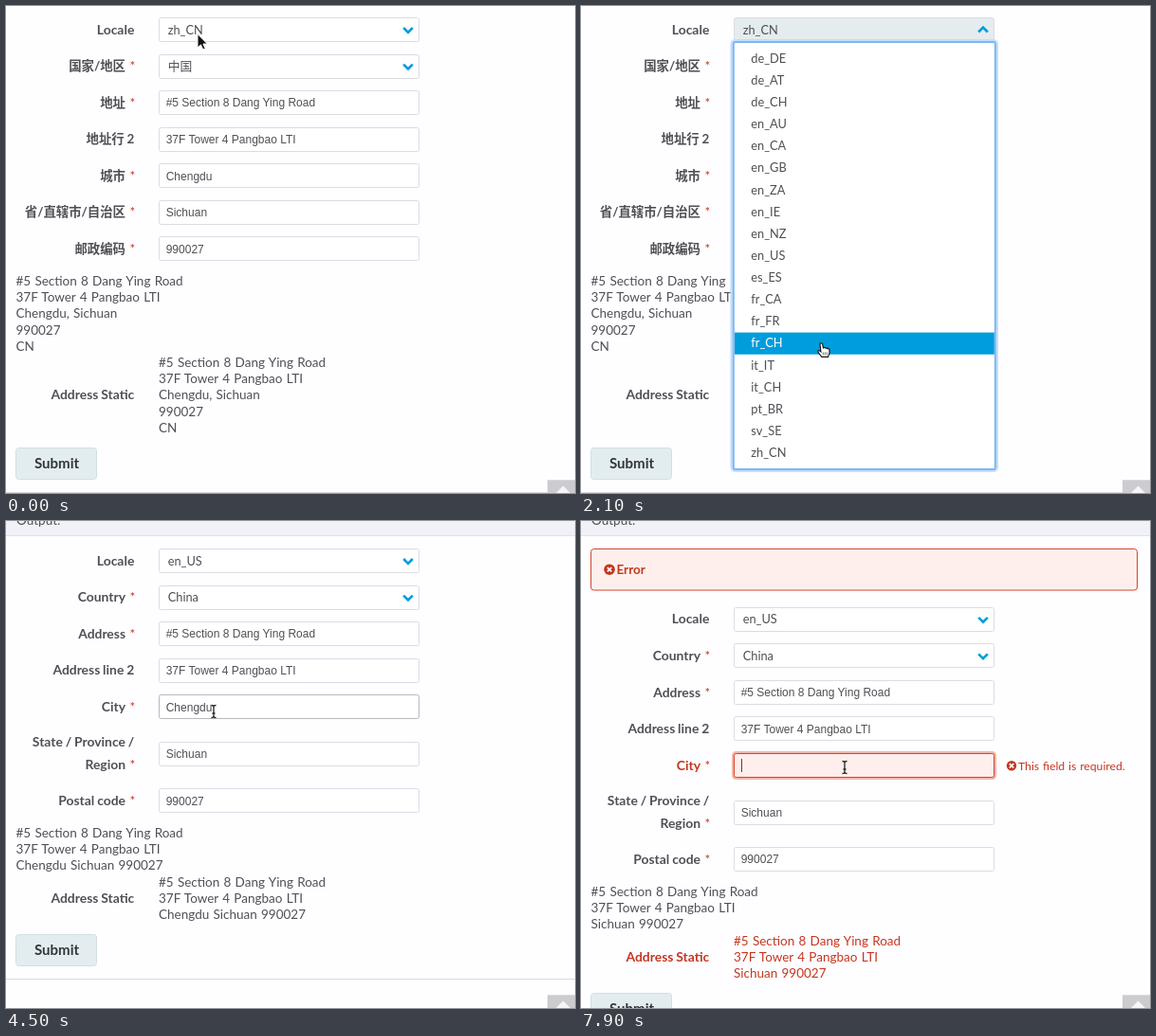
An HTML page that plays this animation: 600 px wide and 514 px high, repeating every 8000 ms.

```html
<!DOCTYPE html>
<html lang="en">
<head>
<meta charset="utf-8">
<title>Address form</title>
<style>
  html, body { margin: 0; width: 100%; height: 100%; overflow: hidden; background: #fefdff; }
  svg { display: block; width: 600px; height: 514px; }
  text { font: 13.5px Lato, "Noto Sans CJK SC", sans-serif; word-spacing: .8px; fill: #4f4f55; white-space: pre; }
  .label { font-weight: 700; font-size: 13.9px; word-spacing: -.5px; text-anchor: end; }
  .cjk { font-size: 13.4px; }
  .field { font: 12px "Liberation Sans", Arial, sans-serif; word-spacing: 0; }
  .pick { font-size: 12.8px; }
  .bold { font-weight: 700; }
  .small { font-size: 12.2px; }
  .red { fill: #c4371f; }
  .white { fill: #fff; }
  .button { font-weight: 700; font-size: 15px; fill: #30353a; }
</style>
</head>
<body>
<svg id="stage" viewBox="0 0 600 514"></svg>
<script>
const LOOP = 8000, STEP = 100, ROW = 38.55, LINE = 17.15, ITEM = 23.13;
const BLUE = '#009ddc', RED = '#d4452c', PINK = '#ffefec';
const STREET = '#5 Section 8 Dang Ying Road', TOWER = '37F Tower 4 Pangbao LTI', ZIP = '990027';
const LOCALES = ('de_DE de_AT de_CH en_AU en_CA en_GB en_ZA en_IE en_NZ en_US ' +
  'es_ES fr_CA fr_FR fr_CH it_IT it_CH pt_BR sv_SE zh_CN').split(' ');
const LABELS = {
  zh: ['Locale', '国家/地区*', '地址*', '地址行 2', '城市*', '省/直辖市/自治区*', '邮政编码*'],
  en: ['Locale', 'Country*', 'Address*', 'Address line 2', 'City*', 'State / Province /|Region*', 'Postal code*']
};
const T = { open: 1000, close: 3500, reload: 3800, hover: 4300, focus: 5600, select: 5900, erase: 6400, error: 6800, refocus: 7500 };

// time, x, y of the pointer's hot spot
const PATH = [
  [0, 202, 29.5], [900, 203, 29.5], [1100, 206, 62], [1300, 228, 167], [1700, 262, 457], [1900, 261, 452],
  [2400, 239, 179], [2600, 240, 182], [2700, 240, 184], [3400, 238, 262], [3700, 238, 262],
  [4400, 219, 201], [5200, 219, 201], [5600, 234, 200], [6500, 234, 200], [7400, 278, 260], [8000, 278, 260]
];
const BOUNCE = [[1300, 0], [1500, -5.5], [1600, -4], [1700, -2.5], [1800, -1], [2000, 0]];

function track(keys, t) {
  if (t <= keys[0][0]) return keys[0].slice(1);
  const i = keys.findIndex(k => k[0] > t);
  if (i < 0) return keys[keys.length - 1].slice(1);
  const a = keys[i - 1], b = keys[i], u = (t - a[0]) / (b[0] - a[0]);
  return a.slice(1).map((v, j) => v + (b[j + 1] - v) * u * u * (3 - 2 * u));
}

const text = (x, y, s, cls = '') => `<text x="${x}" y="${y}" class="${cls}">${s}</text>`;
const rect = (x, y, w, h, fill, stroke = 'none', r = 0, sw = 1) =>
  `<rect x="${x}" y="${y}" width="${w}" height="${h}" rx="${r}" fill="${fill}" stroke="${stroke}" stroke-width="${sw}"/>`;
const path = (d, stroke, w, fill = 'none') =>
  `<path d="${d}" stroke="${stroke}" stroke-width="${w}" fill="${fill}"/>`;
const errorIcon = (x, y, r) => `<circle cx="${x}" cy="${y}" r="${r}" fill="#c4371f"/>` +
  path(`M${x - 2.2} ${y - 2.2}l4.4 4.4m0-4.4l-4.4 4.4`, '#fff', 1.7);

function label(y, s, red) {
  const needed = s.endsWith('*'), lines = s.replace('*', '').split('|');
  const cls = 'label' + (/[^\x00-\x7f]/.test(s) ? ' cjk' : '') + (red ? ' red' : '');
  return lines.map((l, i) => {
    const ly = y + 4.6 + (i - (lines.length - 1) / 2) * 24;
    const star = needed && i === lines.length - 1;
    return text(star ? 126 : 135.3, ly, l, cls) + (star ? text(130.5, ly, '*', 'red') : '');
  }).join('');
}

function input(y, o = {}) {
  const top = Math.round(y - 13) + .5;
  const glow = o.focus ? rect(160.5, top - 1, 276, 27, 'none', o.error ? '#f5b5a9' : '#dcebfa', 3, 3) : '';
  const border = o.error ? RED : o.focus ? '#b4c9de' : o.hover ? '#b9b6be' : '#dcdbe2';
  return glow + rect(161.5, top, 274, 25, o.fill || (o.error ? PINK : '#fff'), border, 2);
}

const chevron = (y, up) => path(`M419.2 ${y + (up ? 2.5 : -2)}l4.8 ${up ? -4.8 : 4.8}l4.8 ${up ? 4.8 : -4.8}`, BLUE, 2.6);

function pointer(kind, x, y) {
  const shapes = {
    arrow: path('M0 0V14.5L3.4 11.4L5.8 16.6L8.2 15.5L5.9 10.5H10.4Z', '#fff', 1, '#111'),
    hand: path('M-1.3 .6Q0-.8 1.3 .6L2.2 5Q3.5 4 4.5 5.2Q6 4.5 6.7 5.9Q8.5 5.3 8.7 7.2V10.5L7.3 14.5H.5L-3.4 9.2Q-3.6 7 -1.6 8L-.3 9Z', '#111', 1.1, '#fff') +
      path('M2 9.5v3M4 9.5v3M6 9.5v3', '#333', .7),
    beam: path('M-2.5-6.5Q0-6.5 0-5V5Q0 6.5-2.5 6.5M2.5-6.5Q0-6.5 0-5M2.5 6.5Q0 6.5 0 5M-1.5 2h3', '#222', 1.3)
  };
  return `<g transform="translate(${x} ${y})">${shapes[kind]}</g>`;
}

function form(t) {
  const en = t >= T.reload, error = t >= T.error, open = t >= T.open && t < T.close;
  const top = error ? 103.8 : en ? 42 : 25;
  const city = t < T.erase ? 'Chengdu' : '';
  const focus = t >= T.focus && t < T.error || t >= T.refocus;
  const values = [t < T.close ? 'zh_CN' : 'en_US', en ? 'China' : '中国', STREET, TOWER, city, 'Sichuan', ZIP];
  const rowY = i => top + i * ROW + (en ? Math.max(0, i - 4) * 11 : 0);
  let out = '';

  if (en) out += rect(-1, -20, 602, 35.5, '#f1f2f8', '#dfe1e9') + text(11, 3.8, 'Output:');
  if (error) out += rect(10.5, 29.5, 576, 43.5, PINK, RED, 3) + errorIcon(30, 51.2, 5.8) + text(37.5, 56, 'Error', 'bold red');

  values.forEach((value, i) => {
    const y = rowY(i), isCity = i === 4;
    out += label(y, LABELS[en ? 'en' : 'zh'][i], isCity && error);
    out += input(y, isCity ? { error, focus, hover: t >= T.hover } : { fill: i === 0 && open && '#e5ecef' });
    if (isCity && t >= T.select && t < T.erase) out += rect(168.7, y - 6.8, 49, 13.6, '#afd0f0');
    out += i < 2 ? text(170.7, y + 4.5, value, 'pick') + chevron(y, i === 0 && open)
                 : text(168.7, y + 4.3, value, 'field');
    if (isCity && focus && (t < T.select || t >= T.erase)) {
      out += rect(city ? 217.5 : 169, y - 7, 1, 14, error ? '#8d2c1c' : '#333');
    }
  });
  if (error) out += errorIcon(454, rowY(4) + .3, 5.2) + text(461, rowY(4) + 4.5, 'This field is required.', 'small red');

  // The page answers an empty city only after it is sent.
  const place = error ? '' : 'Chengdu';
  const lines = en ? [STREET, TOWER, `${place} Sichuan ${ZIP}`.trim()]
                   : [STREET, TOWER, 'Chengdu, Sichuan', ZIP, 'CN'];
  const first = rowY(6) + 34.1, second = first + lines.length * LINE + .2, n = lines.length - 1;
  lines.forEach((s, i) => {
    out += text(10.5, first + i * LINE + 4.7, s);
    out += text(161, second + i * LINE + 4.7, s, error ? 'red' : '');
  });
  out += label(second + n * LINE / 2, 'Address Static', error);
  const foot = Math.round(second + n * LINE + 21) + .5;
  out += rect(10.5, foot, 85, 33, '#e3edf0', '#d2dfe3', 3) + text(30, foot + 21.2, 'Submit', 'button');
  return out + rect(0, foot + 46.5, 600, 1, '#d9d8de');
}

function menu(y) {
  const over = Math.floor((y - 43.9) / ITEM), hot = over < 0 ? 18 : Math.min(over, 18);
  let out = rect(160, 37.5, 277.5, 452, '#fff', '#c2dffa', 3, 5) + rect(160.8, 38, 276, 451, '#fff', '#7db7f3', 2, 2);
  LOCALES.forEach((name, i) => {
    if (i === hot) out += rect(162, 43.9 + i * ITEM, 273.8, ITEM, BLUE);
    out += text(179.3, 59.8 + i * ITEM, name, 'pick' + (i === hot ? ' white' : ''));
  });
  return out;
}

function scene(t) {
  const [x, y] = track(PATH, t), [shift] = track(BOUNCE, t);
  const open = t >= T.open && t < T.close;
  const kind = t < T.open ? 'arrow' : t < T.close ? 'hand' : t < 4100 ? 'arrow' : 'beam';
  return `<g transform="translate(0 ${shift})">${form(t)}${open ? menu(y - shift) : ''}` +
    rect(571, 500.3, 29, 22, '#cccbd0') + path('M577 517l10.5-10.5l10.5 10.5', 'none', 0, '#f6f5f8') +
    '</g>' + pointer(kind, x, y);
}

const stage = document.getElementById('stage');
let shown = -1;
function draw(now) {
  const t = Math.floor(now % LOOP / STEP) * STEP;
  if (t !== shown) stage.innerHTML = scene(shown = t);
  requestAnimationFrame(draw);
}
draw(0);
</script>
</body>
</html>
```
